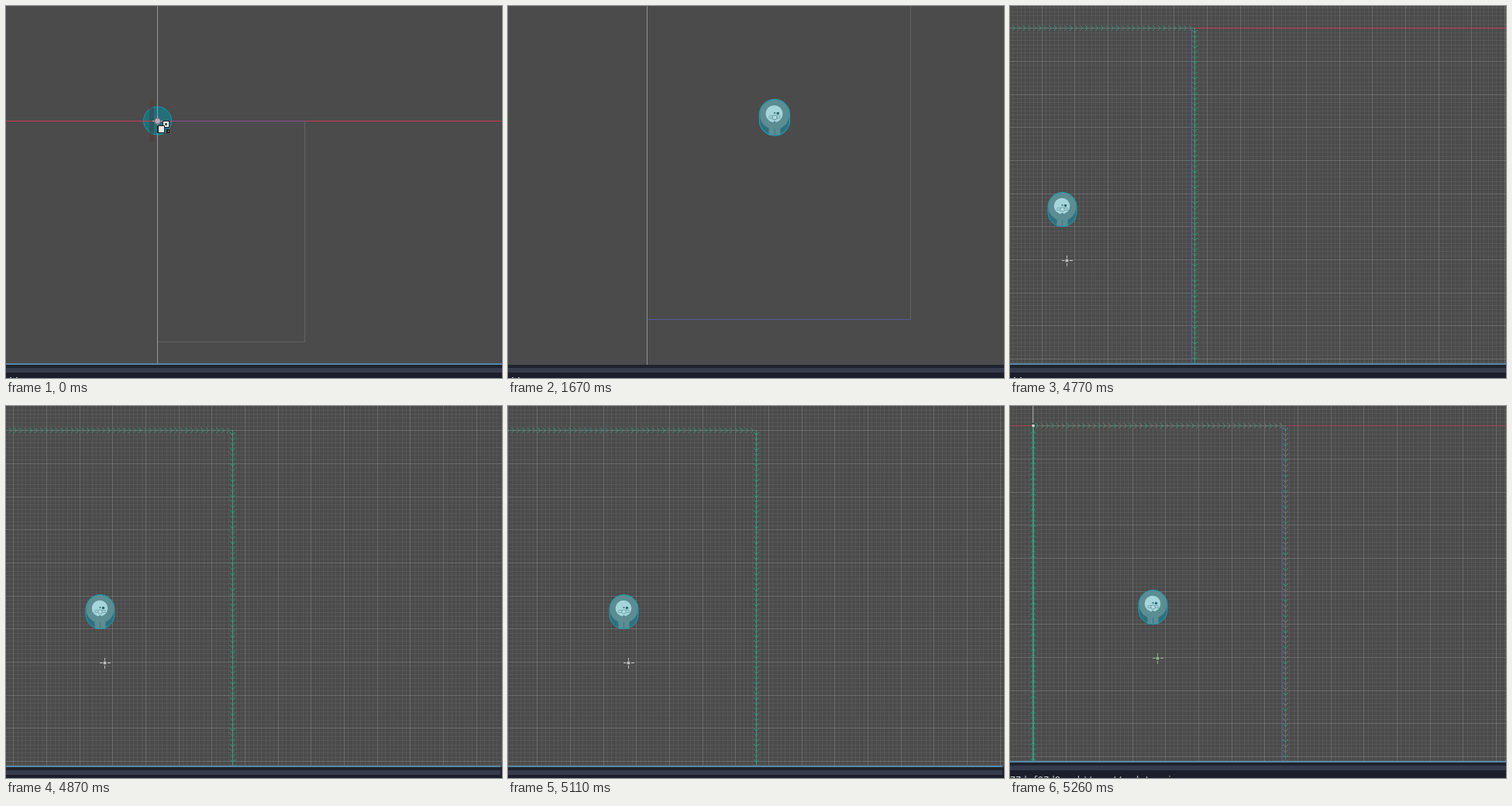
These frames come from a looping animation (640x480 px, 8 s). An HTML page with a canvas:

```html
<!DOCTYPE html>
<html>
<head>
<meta charset="utf-8">
<style>
html, body { margin: 0; width: 100%; height: 100%; overflow: hidden; background: #4b4b4b; }
canvas { display: block; }
</style>
</head>
<body>
<canvas id="stage" width="640" height="480"></canvas>
<script>
const ctx = document.getElementById('stage').getContext('2d');
const LOOP = 8000;
const CELL = 128 / 3;

function rect(color, x, y, w, h) {
  ctx.fillStyle = color;
  ctx.fillRect(x, y, w, h);
}

const hLine = (color, y, x1, x2) => rect(color, x1, y, x2 - x1, 1);
const vLine = (color, x, y1, y2) => rect(color, x, y1, 1, y2 - y1);

function disc(x, y, r, fill, stroke) {
  ctx.beginPath();
  ctx.arc(x, y, r, 0, 7);
  ctx.fillStyle = fill;
  ctx.fill();
  if (stroke) {
    ctx.strokeStyle = stroke;
    ctx.lineWidth = 1;
    ctx.stroke();
  }
}

// Piecewise linear interpolation through [time, value] pairs.
function track(points, t) {
  if (t <= points[0][0]) return points[0][1];
  for (let i = 1; i < points.length; i++) {
    const [t0, v0] = points[i - 1], [t1, v1] = points[i];
    if (t < t1) return v0 + (v1 - v0) * (t - t0) / (t1 - t0);
  }
  return points[points.length - 1][1];
}

function pivot(x, y, color) {
  rect(color, x - 6, y, 4, 1);
  rect(color, x + 4, y, 4, 1);
  rect(color, x, y - 6, 1, 4);
  rect(color, x, y + 4, 1, 4);
  disc(x + 0.5, y + 0.5, 2.5, color, '#555');
}

function character(x, top, scale) {
  ctx.save();
  ctx.translate(x, top);
  ctx.scale(scale, scale);
  ctx.beginPath();
  ctx.arc(0, 19, 18.5, Math.PI, 0);
  ctx.lineTo(18.5, 26);
  ctx.arc(0, 26, 18.5, 0, Math.PI);
  ctx.closePath();
  ctx.fillStyle = '#2d7080';
  ctx.fill();
  disc(0, 19, 18, '#5b8d93');
  rect('#5b8d93', -7, 33, 14, 11);
  rect('#3d7682', -0.5, 36, 1, 8);
  ctx.beginPath();
  ctx.arc(0, 19, 18.5, Math.PI, 0);
  ctx.lineTo(18.5, 26);
  ctx.arc(0, 26, 18.5, 0, Math.PI);
  ctx.closePath();
  ctx.strokeStyle = '#1da3b9';
  ctx.lineWidth = 1;
  ctx.stroke();
  disc(-0.5, 18, 10.3, '#a5d6dc');
  ctx.strokeStyle = '#7aaeb5';
  ctx.strokeRect(-6.5, 20.5, 4, 3);
  ctx.strokeRect(2.5, 20.5, 4, 3);
  disc(0, 22.5, 2.7, '#b9dce0', '#6a9ea6');
  rect('#4c8088', -1, 16, 2, 2);
  disc(4, 17.5, 1.7, '#2b636d');
  rect('#4c8088', -1, 27, 2, 2);
  ctx.restore();
}

function panel(y, focused) {
  const right = y > 463 ? 638 : 640;
  rect('#1f232d', 0, y, 640, 480 - y);
  if (focused) rect('#5688a8', 0, y - 2, right, 2);
  rect('#363c4b', 0, y + 4, right, 6);
  rect('#1c1f2b', 0, y + 10, 640, 20);
  ctx.font = '12px "DejaVu Sans Mono", monospace';
  ctx.fillStyle = '#c8ccd2';
  ctx.fillText('77dcf97d8 - https://godotengine.org', 0, y + 27);
  if (y === 463) {
    rect('#b4b8be', 5, 479, 2, 1);
    rect('#b4b8be', 13, 479, 2, 1);
  }
}

function pointer(x, y) {
  ctx.beginPath();
  [[0, 0], [0, 15], [4, 12], [6, 17], [9, 16], [7, 11], [11, 11]]
    .forEach(([dx, dy]) => ctx.lineTo(x + dx, y + dy));
  ctx.closePath();
  ctx.fillStyle = '#fff';
  ctx.fill();
  ctx.strokeStyle = '#222';
  ctx.lineWidth = 1;
  ctx.stroke();
}

function pointerSweep(t) {
  const step = Math.floor((t - 210) / 24);
  if (step < 0 || step > 14) return;
  const u = step / 14, v = 1 - u;
  pointer(60 * v * v + 2 * 365 * u * v + 568 * u * u,
          2 * 165 * u * v + 476 * u * u);
}

function originScene(t) {
  if (t < 1250) rect(t < 860 ? '#504242' : '#4e4747', 185, 121, 6, 55);
  vLine('#999', 195, 0, 461);
  vLine('#626262', 385, 149, 434);
  hLine('#626262', 433, 196, 386);
  disc(195.5, 148, 18, 'rgba(0,140,160,.55)', '#149bad');
  if (t < 860) rect('rgba(70,50,55,.35)', 185, 131, 6, 34);
  vLine('#7fa0a4', 195, 130, 166);
  hLine('#c83a50', 148, 0, 640);
  hLine('#914b9b', 148, 214, 386);
  pivot(195, 148, '#d5bcc6');
  disc(195.5, 148.5, 4, '#bba9b3', '#665962');
  rect('#222', 202, 148, 9, 9);
  rect('#eee', 203, 149, 7, 7);
  rect('#555', 205, 151, 3, 3);
  rect('#222', 195, 154, 10, 10);
  rect('#e5e5e5', 197, 155, 7, 8);
  rect('#222', 207, 159, 4, 5);
  rect('#ddd', 209, 161, 1, 1);
  panel(463, true);
  pointerSweep(t);
}

function closeScene(t) {
  vLine('#8e8e8e', 179, 0, 463);
  vLine('#636363', 519, 0, 405);
  hLine('#5956a0', 404, 180, 520);
  character(344, 120, 1.06);
  panel(463, t < 1670);
}

function grid(originX, originY) {
  for (const [gap, color] of [[CELL / 8, 'rgba(255,255,255,.06)'], [CELL, 'rgba(255,255,255,.115)']]) {
    for (let x = ((originX % gap) + gap) % gap; x < 640; x += gap)
      vLine(color, Math.round(x), 0, 480);
    for (let y = originY % gap; y < 480; y += gap)
      hLine(color, Math.round(y), 0, 640);
  }
}

function arrows(x, y, angle, length, strong) {
  ctx.save();
  ctx.translate(x, y);
  ctx.rotate(angle);
  ctx.lineWidth = 1;
  for (let d = 6, i = 0; d < length; d += 6.7, i++) {
    ctx.strokeStyle = i % 3 === 0 ? '#2da27f' : strong ? '#3f8d74' : '#77806f';
    ctx.beginPath();
    ctx.moveTo(d - 3.5, -3.5);
    ctx.lineTo(d, 0);
    ctx.lineTo(d - 3.5, 3.5);
    ctx.stroke();
  }
  ctx.restore();
}

function gridScene(t) {
  const settled = t >= 5260;
  const panning = t >= 4770 && !settled;
  const shift = settled ? -3 : t >= 4795 ? 3 : 0;
  const axesVisible = t < 4795 || settled;
  const cornerX = t < 4770 ? 227 : Math.round(track(
    [[4770, 237], [4870, 292], [5110, 320], [5260, 355]], t));
  const originX = cornerX - 325;
  const top = 28 + shift;
  const bottom = 463 + shift;

  grid(originX - 0.3, top + 0.45);
  if (axesVisible) hLine(settled ? '#a84454' : '#d23c52', top, 0, 640);
  hLine(t < 4770 ? '#a04ca6' : '#667a78', top, Math.max(0, originX), cornerX);
  arrows(originX + 0.5, top + 0.5, 0, 325, panning);

  if (axesVisible) vLine('#5558a0', cornerX - 4, top, bottom);
  vLine(panning ? '#2da27f' : '#5d7569', cornerX, top, bottom);
  arrows(cornerX + 0.5, top + 0.5, Math.PI / 2, bottom - top, panning);

  if (originX >= 0) {
    vLine('#999', originX - 1, 0, top);
    rect('#2da27f', originX - 1, top, 2, bottom - top);
    arrows(originX, bottom, -Math.PI / 2, bottom - top, true);
    rect('#444', originX - 3, top - 3, 6, 6);
    disc(originX, top + 0.5, 2, '#c4d4cc');
  }

  character(cornerX - 170.5, 240 + shift, 1);
  const pivotColor = t < 4770 ? '#b5aa7c' : settled ? '#8fb58a' : '#c0c0c0';
  pivot(cornerX - 165, 328 + shift, pivotColor);
  panel(bottom, t >= 3990);
}

function draw(t) {
  rect('#4b4b4b', 0, 0, 640, 480);
  if (t < 1540) originScene(t);
  else if (t < 3600) closeScene(t);
  else gridScene(t);
}

const start = performance.now();
function frame() {
  draw((performance.now() - start) % LOOP);
  requestAnimationFrame(frame);
}
frame();
</script>
</body>
</html>
```
